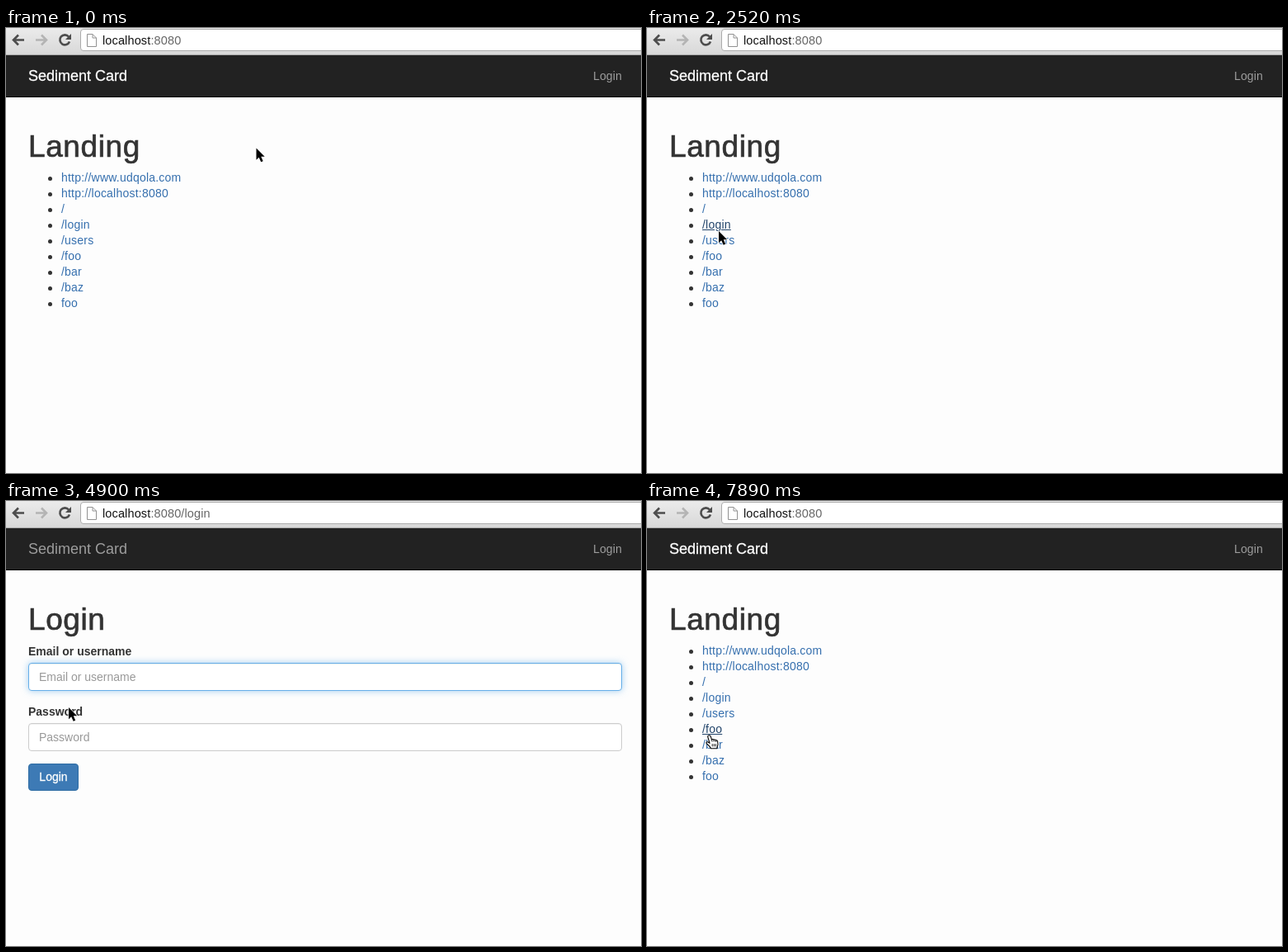
An HTML page that plays this animation: 770x539 px, repeating every 8000 ms.

```html
<!DOCTYPE html>
<html lang="en">
<head>
<meta charset="utf-8">
<title>Login walkthrough</title>
<style>
  html, body { margin: 0; width: 100%; height: 100%; overflow: hidden; }
  body { background: #fdfdfd; }
  #stage {
    position: relative; width: 770px; height: 539px; overflow: hidden;
    background: #fdfdfd; color: #333;
    font: 14px/20px "Liberation Sans", Arial, sans-serif;
  }
  #stage div, #stage svg { position: absolute; box-sizing: border-box; white-space: nowrap; }

  .toolbar { left: 0; top: 0; width: 770px; height: 33px; background: linear-gradient(#ebebeb, #d8d8d8); border-bottom: 1px solid #a9a9a9; }
  .field { left: 90px; top: 1px; width: 700px; height: 27px; background: #fff; border: 1px solid #ababab; border-radius: 4px; }
  .address { left: 117px; top: 5px; font-size: 14.5px; letter-spacing: .13px; color: #666; }
  .address b { font-weight: normal; color: #111; }

  .navbar { left: 0; top: 33px; width: 770px; height: 51px; background: #222; border-bottom: 1px solid #080808; }
  .brand { left: 27px; top: 48px; font-size: 18px; color: #9d9d9d; }
  .brand.lit { color: #fff; -webkit-text-stroke: .3px #fff; }
  .nav-login { right: 23px; top: 48px; color: #9d9d9d; letter-spacing: .15px; }

  .page { left: 0; top: 0; width: 770px; height: 539px; }
  .page h1 {
    position: absolute; left: 27px; top: 124px; margin: 0;
    font-size: 37px; line-height: 40px; font-weight: normal;
    letter-spacing: .6px; -webkit-text-stroke: .7px #333;
  }
  ul { position: absolute; left: 67px; top: 172px; margin: 0; padding: 0; list-style: none; line-height: 19px; }
  li { position: relative; height: 19px; letter-spacing: .22px; white-space: nowrap; }
  li::before { content: ""; position: absolute; left: -16px; top: 8px; width: 5px; height: 5px; border-radius: 50%; background: #333; }
  li span { color: #356fae; }
  li .hover { color: #23456b; text-decoration: underline; }

  .label { left: 27px; font-weight: bold; }
  .input { left: 27px; width: 720px; height: 34px; padding: 6px 12px; background: #fff; border: 1px solid #ccc; border-radius: 4px; color: #999; box-shadow: inset 0 1px 1px rgba(0,0,0,.06); }
  .focus { border-color: #66afe9; box-shadow: inset 0 1px 1px rgba(0,0,0,.07), 0 0 8px rgba(102,175,233,.6); }
  .leaving .focus { border-color: #7fb8e6; box-shadow: 0 0 5px rgba(102,175,233,.4); }
  .button { left: 27px; top: 318px; width: 61px; height: 33px; line-height: 31px; text-align: center; background: #3d7ab5; border: 1px solid #2e6da4; border-radius: 4px; color: #fff; -webkit-text-stroke: .3px #fff; }

  #cursor { left: 0; top: 0; width: 20px; height: 22px; overflow: visible; }
</style>
</head>
<body>
<div id="stage">
  <div class="toolbar"></div>
  <div class="field"></div>
  <svg width="120" height="32" fill="none">
    <g stroke="#4d4d4d" stroke-width="2.6">
      <path d="M22 14.5H10M15 8.5L9 14.5L15 20.5"/>
      <path d="M76 10.5A6 6 0 1 0 77 16.5"/>
    </g>
    <path d="M79 7V14H72Z" fill="#4d4d4d"/>
    <path d="M36 14.5H48M43 8.5L49 14.5L43 20.5" stroke="#b4b4b4" stroke-width="2.6"/>
    <path d="M98.5 7.5H105L109.5 12V22.5H98.5ZM105 7.5V12H109.5" fill="#fff" stroke="#929292"/>
  </svg>
  <div class="address"><b>localhost</b>:8080<span id="route"></span></div>

  <div class="navbar"></div>
  <div class="brand" id="brand">Sediment Card</div>
  <div class="nav-login">Login</div>

  <div class="page" id="landing">
    <h1>Landing</h1>
    <ul>
      <li><span>http://www.udqola.com</span></li>
      <li><span>http://localhost:8080</span></li>
      <li><span>/</span></li>
      <li><span>/login</span></li>
      <li><span>/users</span></li>
      <li><span>/foo</span></li>
      <li><span>/bar</span></li>
      <li><span>/baz</span></li>
      <li><span>foo</span></li>
    </ul>
  </div>

  <div class="page" id="login">
    <h1>Login</h1>
    <div class="label" style="top:172px">Email or username</div>
    <div class="input focus" style="top:196px">Email or username</div>
    <div class="label" style="top:245px">Password</div>
    <div class="input" style="top:269px">Password</div>
    <div class="button">Login</div>
  </div>

  <svg id="cursor">
    <path id="arrow" d="M0 0V14.2L3.2 11.2L5.7 16.8L8.2 15.7L5.8 10.3H10.2Z" fill="#000" stroke="#fff" stroke-width="1.2" paint-order="stroke"/>
    <g id="hand" fill="#fff" stroke="#000" stroke-width="1.1" stroke-linejoin="round">
      <path d="M3.5 1C4.8 .3 5.8 1 6.2 2.2L7.5 6.2C8.2 5.2 9.8 5.4 10 6.4C10.8 5.6 12.2 6 12.4 7C13.4 6.4 14.6 7 14.6 8.2L15 11.5C15 13.5 13.8 14.5 13.8 16.8H6.4C6 14.8 3.6 13 1.2 10.6C.2 9.4 1.6 8.2 3 9L5 10.4L2.8 3C2.5 2 2.8 1.3 3.5 1Z"/>
      <path d="M7.5 6.2L8.1 8.6M10 6.4L10.4 8.6M12.4 7L12.7 9M8.2 11.2V14.4M10.3 11.2V14.4M12.3 11.2V14.4" fill="none" stroke-width=".9"/>
    </g>
    <path id="beam" d="M-3 -7.5Q0 -7.5 0 -5.5Q0 -7.5 3 -7.5M0 -5.5V5.5M-3 7.5Q0 7.5 0 5.5Q0 7.5 3 7.5M-1.5 1.5H1.5" fill="none" stroke="#111" stroke-width="1.2"/>
  </svg>
</div>

<script>
const LOOP = 8000;
const $ = id => document.getElementById(id);
const A = "arrow", H = "hand", I = "beam";

// Each move: start, end, then one pointer pose per evenly spaced step.
const moves = [
  [0, 0, [[303.5, 145.5, A]]],
  [150, 1040, [[296, 150, A], [262, 166, A], [220, 184, A], [168, 196, A], [140, 202, H], [126, 205, H], [121, 205, H]]],
  [1330, 1630, [[119, 197, H], [113, 186, H], [112, 184, H]]],
  [1930, 2960, [[110, 188, H], [106, 196, H], [99, 212, A], [93, 230, A], [87, 246, A], [85, 244, H], [81, 236, H], [79, 229, H]]],
  [3110, 3410, [[82, 215, A], [92, 199, H], [98, 186, H]]],
  [3710, 4600, [[97, 190, H], [90, 204, H], [83, 222, A], [76, 236, H], [71, 238, H], [72, 238, A], [74, 239, A]]],
  [4900, 5940, [[76, 250, A], [79, 272, I], [82, 296, I], [84, 317, A], [86, 300, I], [88, 262, A], [88, 232, A], [88, 213, I]]],
  [6240, 6680, [[86, 190, A], [78, 130, A], [71, 82, A], [69, 65, H]]],
  [6980, 7890, [[69, 65, H], [69, 65, H], [70, 90, A], [71, 150, A], [72, 215, A], [72, 262, H], [71, 283, H]]]
];

const steps = moves.flatMap(([start, end, poses]) =>
  poses.map((pose, k) => ({
    at: Math.round((start + (end - start) * k / Math.max(1, poses.length - 1)) / 10) * 10,
    pose
  })));

const links = [...document.querySelectorAll("li span")];
const within = (t, from, to) => t >= from && t < to;

function draw(t) {
  const [x, y, kind] = steps.filter(s => s.at <= t).pop().pose;
  const onLogin = within(t, 4450, 7130);
  const loginRoute = within(t, 4300, 6980);
  const row = Math.floor((y + 1 - 172) / 19);

  $("landing").style.display = onLogin ? "none" : "block";
  $("login").style.display = onLogin ? "block" : "none";
  $("login").classList.toggle("leaving", t >= 6980);
  $("route").textContent = loginRoute ? "/login" : "";
  $("brand").classList.toggle("lit", !loginRoute || y < 84);
  links.forEach((link, i) =>
    link.classList.toggle("hover", i === row && x < 67 + link.offsetWidth));

  $("cursor").style.transform = `translate(${x}px, ${y}px)`;
  for (const k of [A, H, I]) $(k).style.display = k === kind ? "inline" : "none";
}

const begin = performance.now();
function tick() {
  draw((performance.now() - begin) % LOOP);
  requestAnimationFrame(tick);
}
tick();
</script>
</body>
</html>
```
